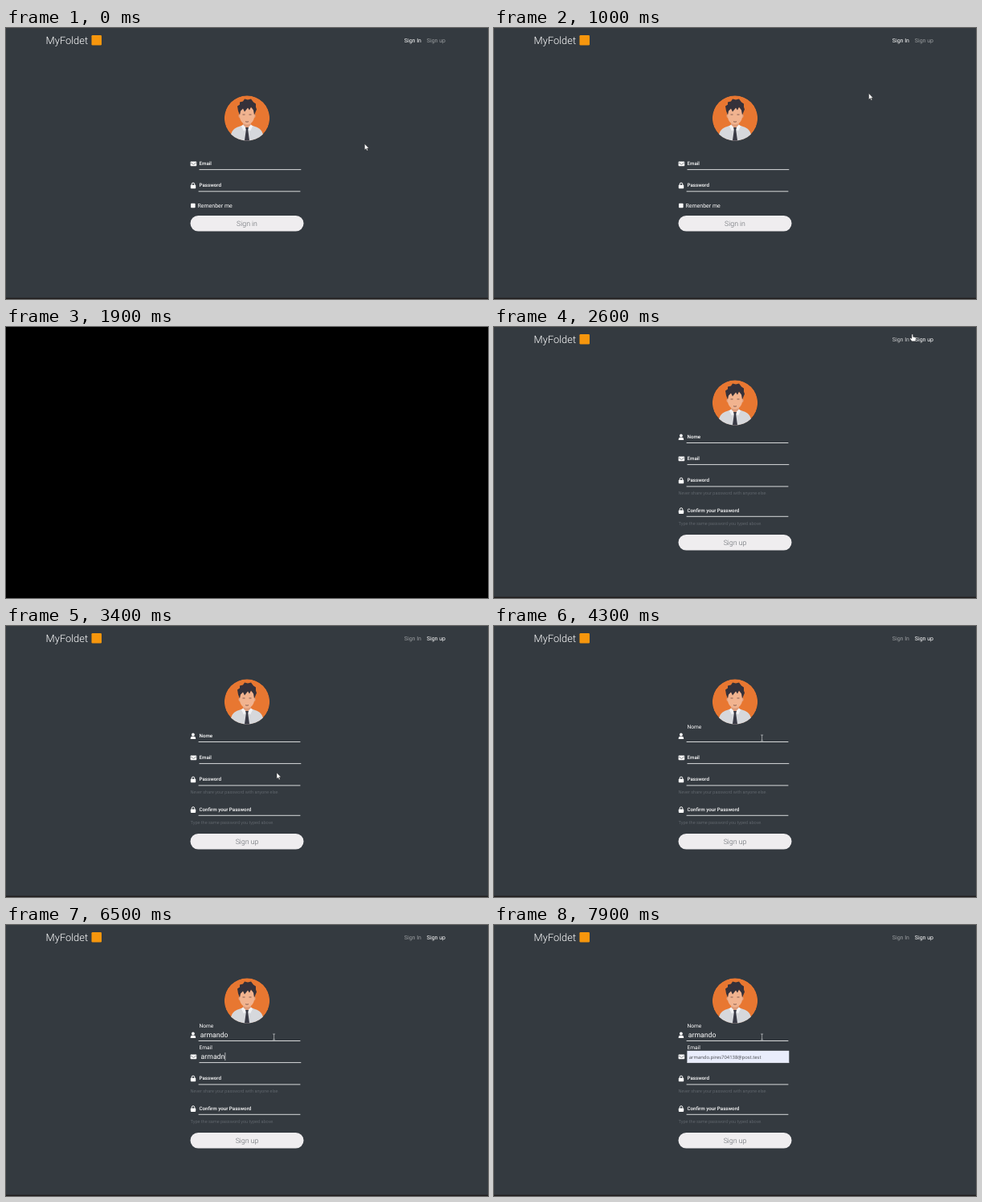
An HTML page for the animation above (8000 ms loop, 600 by 338 pixels).

```html
<!DOCTYPE html>
<html lang="en">
<head>
<meta charset="utf-8">
<title>Wallet sign up</title>
<style>
  html, body { margin: 0; width: 100%; height: 100%; overflow: hidden; background: #000; }
  svg { display: block; width: 100vw; height: 100vh; }
  text { font-family: Roboto, sans-serif; fill: #fff; text-rendering: geometricPrecision; }
  .brand { font-size: 12.9px; font-weight: 300; }
  .nav, .check { font-size: 7px; }
  .label { font-size: 6.2px; font-weight: 500; }
  .help { font-size: 5.6px; font-weight: 300; fill: #70767c; }
  .btn { fill: #efedef; }
  .btn-text { font-size: 8.77px; font-weight: 300; fill: #62666b; text-anchor: middle; }
  .typed { font-size: 8.7px; }
  .auto { font: 5.9px "Open Sans", sans-serif; fill: #44464c; }
  .line { stroke: #d8dadb; stroke-width: 1; }
  .caret { stroke: #fff; stroke-width: .6; }
  .icon { fill: #fff; }
</style>
</head>
<body>
<svg viewBox="0 0 600 338" preserveAspectRatio="none">
  <defs>
    <clipPath id="disc"><circle r="28.2"/></clipPath>
    <g id="avatar" clip-path="url(#disc)">
      <circle r="28.2" fill="#e87731"/>
      <path fill="#d6d8dc" d="M-21 29C-20 15-18 13-6 9H6C18 13 20 15 21 29Z"/>
      <path fill="#dd9c7a" d="M-5 3H5V10L0 14L-5 10Z"/>
      <path fill="#f3f4f6" d="M-5 8L0 13L-4 16L-7 10ZM5 8L0 13L4 16L7 10Z"/>
      <path fill="#393a45" d="M-2 11.5H2L1.2 14.5L3.2 29H-3.2L-1.2 14.5Z"/>
      <ellipse cx="-9" cy="-3" rx="1.5" ry="2.6" fill="#e6a582"/>
      <ellipse cx="9" cy="-3" rx="1.5" ry="2.6" fill="#e6a582"/>
      <path fill="#f1b38f" d="M-9-13H9V-2C9 4 4 8 0 8S-9 4-9-2Z"/>
      <path fill="#35313a" d="M-9-4L-11-9-12-15-9-17-9-20-5-21-3-24 1-23 5-24 8-20 11-18 11-14 12-11 9-4 8-10 5-14 3-10 1-13-3-8-5-12-8-9Z"/>
      <path fill="none" stroke="#6b4a42" stroke-width=".8" d="M-5.5-4.5H-2.5M2.5-4.5H5.5M-2 4.2Q0 5.2 2 4.2"/>
    </g>
    <g id="mail" class="icon">
      <rect width="7.6" height="5.8" rx=".8"/>
      <path d="M.2 1.4L3.8 3.9L7.4 1.4" fill="none" stroke="#343a40" stroke-width=".6"/>
    </g>
    <g id="lock" class="icon">
      <rect y="3.2" width="6.4" height="4.5" rx=".8"/>
      <path d="M1.4 3.6V2.3A1.8 1.8 0 0 1 5 2.3V3.6" fill="none" stroke="#fff" stroke-width="1"/>
    </g>
    <g id="user" class="icon">
      <circle cx="3.2" cy="1.9" r="1.9"/>
      <path d="M0 7.4V6.3Q0 4.2 2 4.2H4.4Q6.4 4.2 6.4 6.3V7.4Z"/>
    </g>
  </defs>

  <g id="page">
    <rect width="600" height="338" fill="#343a40"/>
    <rect y="336.6" width="600" height="1.4" fill="#211d1c"/>
    <text class="brand" x="49.6" y="20.3">MyFoldet</text>
    <rect x="106.5" y="9" width="12.5" height="12.5" rx="1.2" fill="#f7960d"/>
    <text class="nav" id="navIn" x="495.8" y="18.2">Sign In</text>
    <text class="nav" id="navUp" x="523.8" y="18.2">Sign up</text>

    <g id="signIn">
      <use href="#avatar" x="300" y="112.5"/>
      <use href="#mail" x="229.6" y="166.5"/>
      <text class="label" x="240.5" y="170.7">Email</text>
      <path class="line" d="M240.5 176.6H367.3"/>
      <use href="#lock" x="229.8" y="192.6"/>
      <text class="label" x="240.5" y="197.9">Password</text>
      <path class="line" d="M239.6 203.8H366.4"/>
      <rect x="230" y="218.7" width="5.6" height="5.6" rx=".8" fill="#fff"/>
      <text class="check" x="238.4" y="223.8">Remenber me</text>
      <rect class="btn" x="229.5" y="234" width="141" height="19.5" rx="9.75"/>
      <text class="btn-text" x="300" y="246.9">Sign in</text>
    </g>

    <g id="signUp">
      <use href="#avatar" x="300" y="94.5"/>
      <use href="#user" x="229.7" y="133.6"/>
      <path class="line" d="M239.6 144.5H366.4"/>
      <text class="label" id="nameLabel" x="240.5">Nome</text>
      <text class="typed" id="name" x="241.8" y="140.2"></text>
      <use href="#mail" x="229.6" y="161.5"/>
      <path class="line" d="M240.5 171.6H367.3"/>
      <text class="label" id="mailLabel" x="240.5">Email</text>
      <text class="typed" id="mailText" x="242.6" y="167.2"></text>
      <g id="filled">
        <rect x="240.4" y="156.8" width="126.9" height="15" fill="#e9edfc"/>
        <text class="auto" x="242.8" y="167">armando.pires704138@post.test</text>
      </g>
      <path class="caret" id="caret"/>
      <use href="#lock" x="229.8" y="187.6"/>
      <text class="label" x="240.5" y="192.9">Password</text>
      <path class="line" d="M239.6 198.9H366.4"/>
      <text class="help" x="229.6" y="209.2">Never share your password with anyone else.</text>
      <use href="#lock" x="229.8" y="225.2"/>
      <text class="label" x="240.5" y="230.6">Confirm your Password</text>
      <path class="line" d="M239.6 236.3H366.4"/>
      <text class="help" x="229.6" y="246.5">Type the same password you typed above.</text>
      <rect class="btn" x="229.5" y="259" width="141" height="19.5" rx="9.75"/>
      <text class="btn-text" x="300" y="271.9">Sign up</text>
    </g>

    <g id="cursor">
      <path id="arrow" fill="#fff" stroke="#222" stroke-width=".4" d="M0 0V7.6L1.8 6L3 8.7L4.2 8.2L3 5.6H5.3Z"/>
      <path id="hand" fill="#fff" stroke="#222" stroke-width=".35" d="M-.8 .8Q0-.6 .8 .8V3.4L3.9 4.2Q4.6 4.5 4.5 5.4L3.8 9H-.6L-3 6Q-3.2 4.8-2 5L-.8 5.8Z"/>
      <path id="beam" fill="none" stroke="#c3c6c9" stroke-width=".7" d="M-1.5-3.5H1.5M0-3.5V3.5M-1.5 3.5H1.5"/>
    </g>
  </g>
</svg>
<script>
const LOOP = 8000, STEP = 100;
const LEAVE = 1900, LOADED = 2600, CLICK = 3700, TAB = 5500, AUTOFILL = 7900;
const $ = id => document.getElementById(id);
const show = (id, on) => $(id).style.display = on ? '' : 'none';
const clamp = v => Math.min(1, Math.max(0, v));
const ease = v => v * v * (3 - 2 * v);
const mix = (a, b, k) => a + (b - a) * k;

// time, x, y of the pointer
const path = [
  [0, 446.4, 144.4], [100, 452.6, 137], [200, 434.6, 122], [400, 434.6, 122],
  [500, 434.6, 115], [600, 435, 109], [700, 435, 109], [1500, 534.8, 22.4],
  [LEAVE, 534.8, 22.4], [LOADED, 520.8, 8.8], [3400, 337, 183],
  [CLICK, 333.6, 139.5], [LOOP, 333.6, 139.5]
];

// first key time, gap between keys, field content after each key
const grow = s => [...s].map((_, i) => s.slice(0, i + 1));
const nameKeys = [[4500, 130, grow('armando')]];
const mailKeys = [
  [5850, 120, grow('armadn')],
  [6750, 170, ['armad', 'arma', 'arman', 'armand', 'armando']]
];

function pointer(t) {
  const i = Math.max(1, path.findIndex(p => p[0] >= t));
  const [t0, x0, y0] = path[i - 1], [t1, x1, y1] = path[i];
  const k = ease(clamp((t - t0) / (t1 - t0)));
  return [mix(x0, x1, k), mix(y0, y1, k)];
}

function typed(runs, focus, t) {
  let text = '', last = focus;
  for (const [start, gap, states] of runs) {
    if (t < start) break;
    const n = Math.min(states.length - 1, Math.floor((t - start) / gap));
    text = states[n];
    last = start + n * gap;
  }
  return { text, last };
}

function floatLabel(id, rest, since) {
  const k = ease(clamp(since / 400)), el = $(id);
  el.setAttribute('y', rest - 10.5 * k);
  el.style.fontSize = mix(6.2, 6.6, k) + 'px';
  el.style.fontWeight = since > 0 ? 400 : 500;
}

function placeCaret(t, field, last, bottom) {
  const on = t >= CLICK && t < AUTOFILL && (t - last) % 1060 < 530;
  show('caret', on);
  if (!on) return;
  const el = $(field);
  const x = +el.getAttribute('x') + el.getComputedTextLength() + .5;
  $('caret').setAttribute('d', `M${x} ${bottom - 10}V${bottom}`);
}

function render(t) {
  show('page', t < LEAVE || t >= LOADED);
  const up = t >= LOADED;
  show('signIn', !up);
  show('signUp', up);

  const hover = up ? 1 - clamp((t - LOADED) / 200) : clamp((t - 1400) / 150);
  $('navIn').style.fillOpacity = up ? mix(.5, .75, hover) : 1;
  $('navUp').style.fillOpacity = up ? 1 : mix(.5, .75, hover);

  const [x, y] = pointer(t);
  const onLink = y < 28 && x > 518;
  const onField = up && x < 366 && Math.abs(y - 138) < 8;
  $('cursor').setAttribute('transform', `translate(${x} ${y})`);
  show('hand', onLink);
  show('beam', onField);
  show('arrow', !onLink && !onField);

  const name = typed(nameKeys, CLICK, t), mail = typed(mailKeys, TAB, t);
  $('name').textContent = name.text;
  $('mailText').textContent = mail.text;
  floatLabel('nameLabel', 138.5, t - CLICK);
  floatLabel('mailLabel', 165.8, t - TAB);
  show('filled', t >= AUTOFILL);
  if (t < TAB) placeCaret(t, 'name', name.last, 142);
  else placeCaret(t, 'mailText', mail.last, 169);
}

const begin = performance.now();
function tick() {
  const t = (performance.now() - begin) % LOOP;
  render(Math.floor(t / STEP) * STEP);
  requestAnimationFrame(tick);
}
tick();
</script>
</body>
</html>
```
